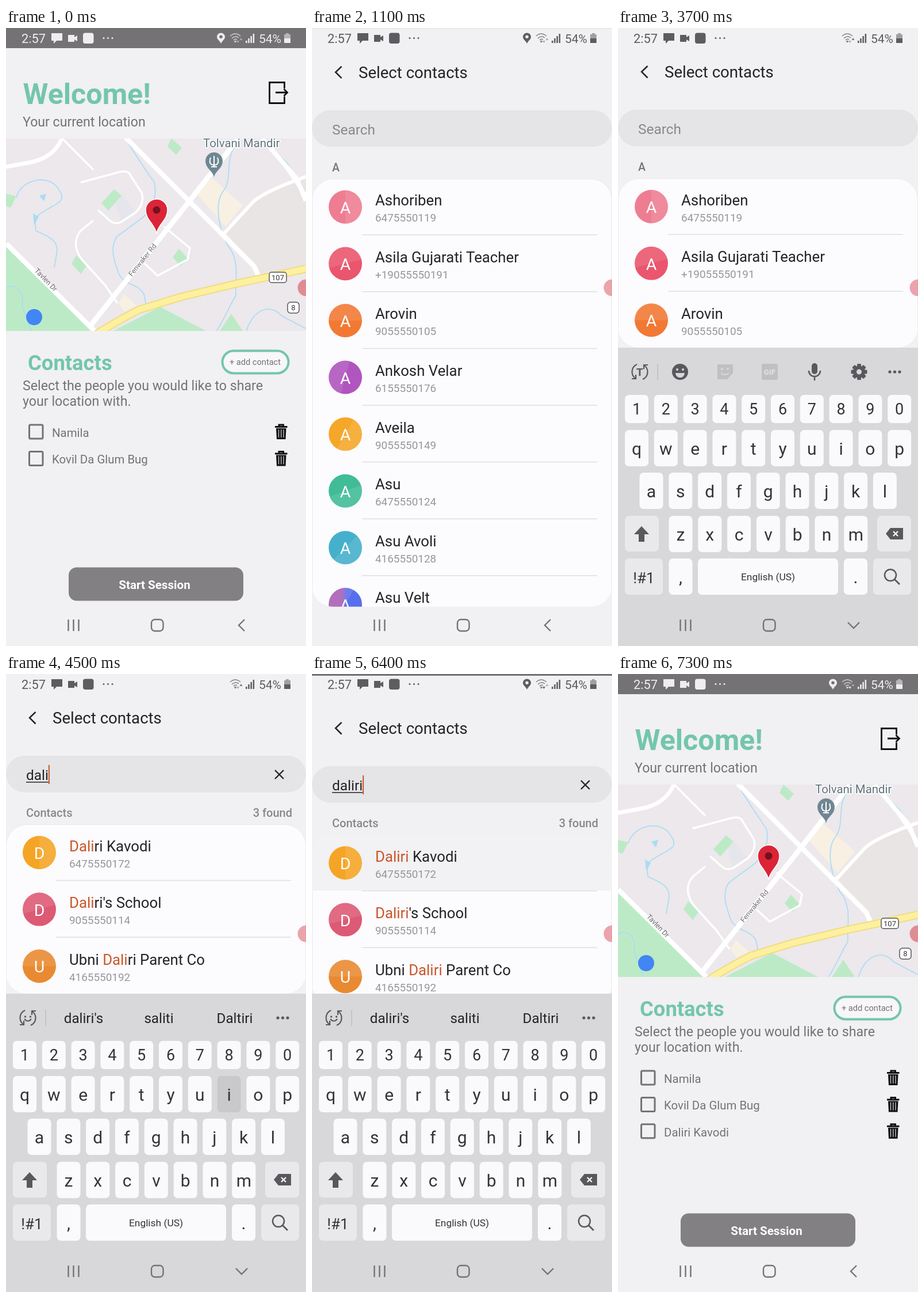
Recreate the animation shown at these times as an HTML page. Size 522 by 1073 pixels, loop 7.4 s.

```html
<!DOCTYPE html>
<html lang="en">
<head>
<meta charset="utf-8">
<title>Share location</title>
<style>
  html, body { margin: 0; width: 100%; height: 100%; overflow: hidden; background: #f1f0f2; }
  svg { display: block; width: 100vw; height: 100vh; font-family: Roboto, "Noto Sans", sans-serif; }
  text { white-space: pre; }
</style>
</head>
<body>
<svg id="stage" viewBox="0 0 522 1073" preserveAspectRatio="none"></svg>
<script>
const LOOP = 7400, QUERY = 'daliri';
const TYPE_TIMES = [3800, 4000, 4200, 4500, 4800, 5100];
const GREEN = '#73c6ab', GREY = '#757277', INK = '#242326';

const text = (x, y, size, fill, str, extra = '') =>
  `<text x="${x}" y="${y}" font-size="${size}" fill="${fill}" ${extra}>${str}</text>`;
const rect = (x, y, w, h, r, fill, extra = '') =>
  `<rect x="${x}" y="${y}" width="${w}" height="${h}" rx="${r}" fill="${fill}" ${extra}/>`;
const line = (d, color, width, extra = '') =>
  `<path d="${d}" fill="none" stroke="${color}" stroke-width="${width}" ${extra}/>`;
const shape = (d, fill, extra = '') => `<path d="${d}" fill="${fill}" ${extra}/>`;
const circle = (x, y, r, fill, extra = '') =>
  `<circle cx="${x}" cy="${y}" r="${r}" fill="${fill}" ${extra}/>`;
const group = (id, body, extra = '') => `<g id="${id}" ${extra}>${body}</g>`;
const MID = 'text-anchor="middle"', BOLD = 'font-weight="700"';

function mapView() {
  const roads = (d, w) => line(d, '#fff', w, 'stroke-linejoin="round"');
  const water = 'M208 192C224 218 238 240 258 268C264 292 254 320 230 335L193 362C180 382 188 404 196 426C206 448 228 442 240 462L246 492' +
    'M398 206C380 232 396 262 376 286C362 310 372 352 386 378C408 402 398 440 400 464C384 492 380 506 366 526' +
    'M18 294C26 262 78 250 94 284C108 306 76 306 50 330L52 352C70 360 94 368 88 392L84 416' +
    'M0 452C16 440 34 460 28 482L44 526M418 526C430 490 458 476 480 500L522 522M462 192C452 214 484 220 496 246';
  const greens = 'M0 370L158 526H0ZM288 192L306 208L296 220L281 206ZM166 304L188 280L201 291L178 317Z' +
    'M122 395L141 412L130 427L114 409ZM301 383L318 402L303 413L290 398ZM268 484L348 526H186ZM392 496L412 526H372Z' +
    'M0 288L18 292L8 312L0 309Z';
  const highway = 'M158 531Q196 507 232 489L304 467L400 444L522 418';
  return `<g clip-path="url(#mapClip)">
    ${rect(0, 192, 522, 334, 0, '#ece8ec')}
    ${shape('M380 350L440 292L522 262V412L438 428Z', '#e9e5e4')}
    ${shape('M330 286L358 260L412 308L382 345ZM205 462L228 482L206 492L196 478Z', '#f8f0e2')}
    ${shape('M188 297L202 291L224 318L200 336Z', '#e5e6ec')}
    ${shape(greens, '#bdeac6')}
    ${line(water, '#a9dcf5', 1.7)}
    ${shape('M58 291L70 288L66 301ZM47 322L57 328L49 342Z', '#a9dcf5')}
    ${roads('M98 192L152 246M130 268L198 250Q214 246 218 258L236 286Q242 304 226 320L200 337Q190 342 180 334L160 316M152 334L130 352Q112 374 132 402L172 446L194 478M275 345L320 382L316 402L264 430L240 408', 3.5)}
    ${roads('M0 241L44 233Q84 224 97 192', 7)}
    ${roads('M380 356L428 304Q444 286 522 258M478 228L522 292', 6)}
    ${roads('M446 192L484 236L506 262L522 300', 8)}
    ${roads('M0 374L158 530M208 190L320 302L432 414L440 432', 8.5)}
    ${roads('M146 518L318 302L404 192', 9)}
    ${line(highway, '#f0da7c', 14)}
    ${line(highway, '#fdf09e', 10.5)}
    ${text(0, 0, 12, '#6b6c70', 'Fenwaker Rd', 'transform="translate(219 432) rotate(-51)"')}
    ${text(0, 0, 12.2, '#6b6c70', 'Tavlen Dr', 'transform="translate(49 422) rotate(46)"')}
    ${text(343, 207, 20.4, '#60727c', 'Tolvani Mandir', 'stroke="#fff" stroke-width="3" paint-order="stroke"')}
    ${shape('M362 259C360 248 347 244 347 231A15 15 0 0 1 377 231C377 244 364 248 362 259Z', '#6f8792')}
    ${line('M362 222V241M356 225C352 236 358 238 362 238C366 238 372 236 368 225M357 241H367', '#fff', 2)}
    ${shape('M262 357C259 340 243 334 243 316A19 19 0 0 1 281 316C281 334 265 340 262 357Z', '#db2438', 'stroke="#fff" stroke-width="1.5"')}
    ${circle(262, 316, 6.5, '#74111c')}
    ${rect(458, 424, 30, 18, 4, '#fff', 'stroke="#55565a" stroke-width="1.5"')}
    ${text(473, 438, 13, '#333', '107', MID)}
    ${rect(490, 476, 20, 19, 5, '#fff', 'stroke="#55565a" stroke-width="1.5"')}
    ${text(500, 490, 13, '#333', '8', MID)}
    ${circle(49, 502, 14, '#4285f4')}
  </g>`;
}

function savedContact(name, i) {
  const y = 701 + i * 46.4;
  return rect(40.5, y - 12, 23.5, 24, 2, 'none', `stroke="${GREY}" stroke-width="3"`) +
    text(80, y + 9, 20.4, GREY, name) +
    line(`M468 ${y - 8.5}H489.5M475 ${y - 9}V${y - 12}H482.5V${y - 9}`, '#111', 3) +
    shape(`M470 ${y - 6}H487.500L486.500 ${y + 13}H471Z`, '#111') +
    line(`M474.500 ${y - 4}V${y + 10}M478.800 ${y - 4}V${y + 10}M483 ${y - 4}V${y + 10}`, '#d5d4d6', 1.3);
}

function home() {
  return rect(0, 0, 522, 1073, 0, '#f1f0f2') + rect(0, 0, 522, 35, 0, '#747275') +
    text(29.5, 132, 50.2, GREEN, 'Welcome!', BOLD) +
    text(29, 171, 23.1, GREY, 'Your current location') +
    line('M484.500 105V94.500H458.500V130.500H484.500V119M469 112H489M483.500 106L489.500 112L483.500 118', '#111', 2.8) +
    mapView() +
    text(38, 594, 36.4, GREEN, 'Contacts', BOLD) +
    group('addButton', rect(376.5, 560.5, 115, 39, 19.5, '#f7f6f8', `stroke="${GREEN}" stroke-width="4"`) +
      text(433.5, 585, 14.6, GREY, '+ add contact', MID)) +
    text(29, 629, 23.2, GREY, 'Select the people you would like to share') +
    text(29, 656, 23.2, GREY, 'your location with.') +
    ['Namila', 'Kovil Da Glum Bug'].map(savedContact).join('') +
    group('newContact', savedContact('Daliri Kavodi', 2)) +
    rect(109, 936.5, 304, 58, 14, '#828083') +
    text(258.5, 974, 20.6, '#fff', 'Start Session', `${MID} ${BOLD}`);
}

function contactRow([name, phone, color], i) {
  const y = 310 + i * 98.6;
  const tilt = [90, -15, 0, -75, 120, 160, 135, -60][i];
  return circle(58, y, 29, color) +
    shape(`M29 ${y}A29 29 0 0 1 87 ${y}Z`, '#fff', `opacity=".1" transform="rotate(${tilt} 58 ${y})"`) +
    text(58, y + 11, 28.5, '#fff', name.replace(/<[^>]+>/g, '')[0], MID) +
    text(110, y - 2.5, 25.8, INK, name) +
    text(110, y + 25.5, 18.9, '#97969a', phone) +
    line(`M87 ${y + 48.5}H496`, '#dfdee1', 1.5);
}

const PEOPLE = [
  ['Ashoriben', '6475550119', '#ee7d92'],
  ['Asila Gujarati Teacher', '+19055550191', '#ea566d'],
  ['Arovin', '9055550105', '#f27934'],
  ['Ankosh Velar', '6155550176', '#b055bd'],
  ['Aveila', '9055550149', '#f5a72a'],
  ['Asu', '6475550124', '#40bc97'],
  ['Asu Avoli', '4165550128', '#45b0cb'],
  ['Asu Velt', '6475550163', 'url(#violet)']
];
const FOUND = [
  ['Daliri Kavodi', '6475550172', '#f5a526'],
  ["Daliri's School", '9055550114', '#dc5a74'],
  ['Ubni Daliri Parent Co', '4165550192', '#e98a32']
];

function foundRows(count) {
  const mark = name => name.replace('Daliri', w =>
    `<tspan fill="#c9572b">${w.slice(0, count)}</tspan>${w.slice(count)}`);
  return FOUND.map(([name, ...rest], i) => contactRow([mark(name), ...rest], i)).join('');
}

function picker() {
  return rect(0, 0, 522, 1100, 0, '#f1f0f2', 'id="pickerBack"') + group('pickerBody',
    line('M51.500 66L41 76L51.500 86.500', INK, 2.5) +
    text(81, 86, 27.6, INK, 'Select contacts') +
    rect(0, 142, 522, 63.5, 31.7, '#e5e4e6') +
    text(35, 184, 24.4, '#89888b', 'Search', 'id="hint"') +
    text(35, 184, 24.4, INK, '', 'id="typed"') +
    rect(35, 187, 0, 1.5, 0, INK, 'id="underline"') +
    rect(35, 158, 2, 33, 0, '#c9572b', 'id="caret"') +
    group('browseHead', text(35, 248, 19.5, '#77767a', 'A', 'font-weight="500"')) +
    group('foundHead', line('M468 167L483 182M483 167L468 182', INK, 2.4) +
      text(35, 248, 20, '#88878a', 'Contacts', 'font-weight="500"') +
      text(498, 248, 20, '#88878a', '3 found', 'font-weight="500" text-anchor="end"')) +
    rect(0, 555, 522, 449, 0, '#fcfbfd', 'id="blank"') +
    `<g clip-path="url(#listClip)">${rect(.5, 261.5, 521, 900, 36, '#fcfbfd', 'stroke="#e9e8ea"')}
      ${rect(0, 261, 522, 97, 0, '#f2f1f3', 'id="pressedRow"')}
      ${group('browse', PEOPLE.map(contactRow).join(''))}${group('found', '')}</g>`);
}

function key(label, x, y, w = 41, h = 62, fill = '#faf9fb', size = 30) {
  return rect(x, y, w, h, 7, fill, /^[a-z]$/.test(label) ? `id="key-${label}"` : '') +
    text(x + w / 2, y + h / 2 + (h < 55 ? 9.5 : 11), h < 55 ? 27 : size, '#343337', label, MID);
}

function keyboard() {
  const row = (letters, x, y, h) => [...letters].map((c, i) => key(c, x + i * 50.8, y, 41, h)).join('');
  const dark = '#59585c', pale = '#c0bfc2';
  const turn = line('M33 584A14 14 0 0 0 30 608M43 610A14 14 0 0 0 46 586M24 609H31V602M52 585H45V592', dark, 2.2);
  const teeth = Array.from({ length: 8 }, (_, i) => rect(416, 583, 7, 8, 1.5, dark, `transform="rotate(${i * 45} 419.5 597)"`)).join('');
  const smile = (x, y, r) => circle(x, y, r, dark) + circle(x - 5, y - 4, 2, '#d8d7da') +
    circle(x + 5, y - 4, 2, '#d8d7da') + shape(`M${x - 8} ${y + 2}H${x + 8}A8 8 0 0 1 ${x - 8} ${y + 2}Z`, '#d8d7da');
  const tools = text(38, 604, 19, dark, 'T', `${MID} ${BOLD}`) + smile(108, 597, 14) +
    shape('M173 584H200V599L190 610H173Z', pale) + circle(181, 592, 2, '#d8d7da') + circle(191, 592, 2, '#d8d7da') +
    line('M179 599Q186 605 193 599', '#d8d7da', 2) +
    rect(250, 583, 28, 28, 3, pale) + text(264, 602, 13, '#e3e2e5', 'GIF', `${MID} ${BOLD}`) +
    rect(337, 582, 10, 19, 5, dark) + line('M332 595A10 10 0 0 0 352 595M342 605V612', dark, 2.6) +
    teeth + circle(419.5, 597, 7.5, 'none', `stroke="${dark}" stroke-width="6"`);
  const words = circle(33.5, 595, 1.7, dark) + circle(42.5, 595, 1.7, dark) + line('M32 599Q38 606 44 599', dark, 2) +
    [["daliri's", 135], ['saliti', 266], ['Daltiri', 398]].map(([w, x]) => text(x, 606, 24.2, INK, w, MID)).join('');
  return rect(0, 555, 522, 518, 0, '#d8d7da') + turn + line('M69 583V611', '#bebdc0', 1.5) +
    [473, 481.5, 490].map(x => circle(x, 597, 2.6, dark)).join('') +
    group('tools', tools) + group('words', words) +
    row('1234567890', 12, 637, 49) + row('qwertyuiop', 12, 698, 63) +
    row('asdfghjkl', 37.5, 772, 63) + row('zxcvbnm', 88.5, 847, 63) +
    rect(12, 847, 59, 62, 7, '#e9e8ea') + shape('M41 865L54 879H46V892H36V879H28Z', dark) +
    rect(451, 847, 59, 62, 7, '#e9e8ea') + shape('M466 878L474 868H496V888H474Z', dark) + line('M479 874L487 882M487 874L479 882', '#fff', 2.2) +
    key('!#1', 12, 921, 66, 63, '#e9e8ea', 26) + key(',', 88.5, 921, 41, 63) +
    rect(139, 921, 244, 63, 7, '#faf9fb') + text(261, 959, 17.4, '#343337', 'English (US)', MID) +
    key('.', 393, 921, 41, 63) + rect(444, 921, 66, 63, 7, '#e9e8ea') +
    circle(474, 950, 10, 'none', `stroke="${dark}" stroke-width="2.5"`) + line('M481 957L490 966', dark, 2.8);
}

function statusBar() {
  const c = 'currentColor';
  return text(27, 26, 21.8, c, '2:57') + shape('M79 9H98V22H88L83 27V22H79Z', c) +
    shape('M108 12H119V16L124 13V23L119 20V24H108Z', c) + rect(134, 8.5, 18.5, 18.5, 4, c) +
    [170, 177.5, 185].map(x => circle(x, 17.5, 1.5, c)).join('') +
    shape('M374 27C372 22 367 20 367 15.5A7 7 0 0 1 381 15.5C381 20 376 22 374 27ZM374 12.5A2.7 2.7 0 1 0 374 18A2.7 2.7 0 1 0 374 12.5Z', c, 'id="place" fill-rule="evenodd"') +
    line('M390 14Q399 6 408 14M393 18Q399 12 405 17M396 21Q399 18 402 20', c, 1.6, 'opacity=".75"') +
    circle(399, 23.5, 1.8, c, 'opacity=".75"') +
    shape('M401 22H406L403.500 26Z', c, 'id="arrowDown"') + shape('M406.500 21H411.500L409 17Z', c, 'id="arrowUp"') +
    [0, 1, 2, 3].map(i => rect(417 + i * 4.2, 22 - i * 4, 2.5, 4 + i * 4, 0, c)).join('') +
    text(440, 26, 21, c, '54%') + shape('M484 11H487V9H492V11H495V26H484Z', c, 'opacity=".55"') + rect(484, 18, 11, 8, 1, c);
}

const stage = document.getElementById('stage');
stage.innerHTML = `<defs>
  <clipPath id="mapClip"><rect y="192" width="522" height="334"/></clipPath>
  <clipPath id="listClip"><rect id="listArea" y="261" width="522" height="743" rx="36"/></clipPath>
  <linearGradient id="violet"><stop offset=".4" stop-color="#a95fb4"/><stop offset=".55" stop-color="#576fec"/></linearGradient>
  </defs>` +
  group('home', home()) + group('picker', picker()) + group('keyboard', keyboard()) +
  group('status', statusBar()) +
  line('M108.500 1027V1047M117.500 1027V1047M126.500 1027V1047', GREY, 2.4) +
  rect(253, 1027, 20.500, 20, 6, 'none', `stroke="${GREY}" stroke-width="2.4"`) +
  line('', GREY, 2.4, 'id="back"') +
  circle(522, 451, 14.5, '#d94e59', 'id="touch"');

const parts = {};
stage.querySelectorAll('[id]').forEach(node => parts[node.id] = node);
const set = (id, attrs) => { for (const k in attrs) parts[id].setAttribute(k, attrs[k]); };
const show = (id, on) => set(id, { visibility: on ? 'visible' : 'hidden' });
const clamp = v => Math.max(0, Math.min(1, v));

// Slide distance and opacity of the picker page.
function pickerPose(t) {
  if (t < 900 || t >= 6600) return { y: 0, alpha: 0 };
  if (t < 6400) {
    const p = clamp((t - 860) / 300);
    return { y: 90 * (1 - p) ** 3, alpha: clamp(p * 3) };
  }
  return t < 6500 ? { y: 18, alpha: 1 } : { y: 75, alpha: .45 };
}

function keyboardPose(t) {
  if (t < 2300 || t >= 6600) return { y: 518, alpha: 0 };
  if (t < 2400 || t >= 6500) return { y: 131, alpha: .16 };
  return t < 2500 ? { y: 28, alpha: .75 } : { y: 0, alpha: 1 };
}

let shownCount = -1, pressed = null;
function showQuery(count) {
  if (count === shownCount) return;
  shownCount = count;
  parts.typed.textContent = QUERY.slice(0, count);
  parts.found.innerHTML = count ? foundRows(count) : '';
  const width = count ? parts.typed.getComputedTextLength() : 0;
  set('underline', { width });
  set('caret', { x: 35 + width });
  for (const id of ['hint', 'browse', 'browseHead', 'tools']) show(id, !count);
  for (const id of ['foundHead', 'words']) show(id, count > 0);
}

function render(time) {
  const t = Math.floor((time % LOOP) / 100) * 100;
  const between = (a, b) => t >= a && t < b;
  const page = pickerPose(t), keys = keyboardPose(t);
  const focused = between(2200, 6600), light = page.alpha < .6;

  set('addButton', { opacity: between(300, 400) ? .4 : 1 });
  show('newContact', t >= 6700);
  set('picker', { opacity: page.alpha });
  set('pickerBack', { y: page.y / 6 });
  set('pickerBody', { transform: `translate(0 ${page.y})` });
  set('listArea', { height: focused ? 294 : 743 });
  set('blank', { opacity: focused ? 1 : 0 });
  set('pressedRow', { opacity: between(6200, 6600) ? 1 : 0 });
  set('caret', { opacity: focused && !between(2700, 3200) && !between(3700, 3800) && !between(5600, 6100) ? 1 : 0 });
  showQuery(t < 6800 ? TYPE_TIMES.filter(at => t >= at).length : 0);

  set('keyboard', { opacity: keys.alpha, transform: `translate(0 ${keys.y})` });
  if (pressed) set(pressed, { fill: '#faf9fb' });
  const index = TYPE_TIMES.indexOf(t);
  pressed = index < 0 ? null : 'key-' + QUERY[index];
  if (pressed) set(pressed, { fill: '#c9c8cb' });

  set('status', { color: light ? '#eeedf0' : '#5d5c60' });
  show('place', !between(1500, 6300));
  set('arrowDown', { opacity: between(1800, 2800) || t >= 5800 ? .9 : .45 });
  set('arrowUp', { opacity: between(2800, 5800) ? .8 : .45 });
  set('back', { d: between(2300, 6600) ? 'M400 1032L410 1042L420 1032' : 'M415 1027L405 1037L415 1047' });
  set('touch', { opacity: light ? .6 : .5 });
}

function frame(now) {
  render(now);
  requestAnimationFrame(frame);
}
render(0);
requestAnimationFrame(frame);
</script>
</body>
</html>
```
